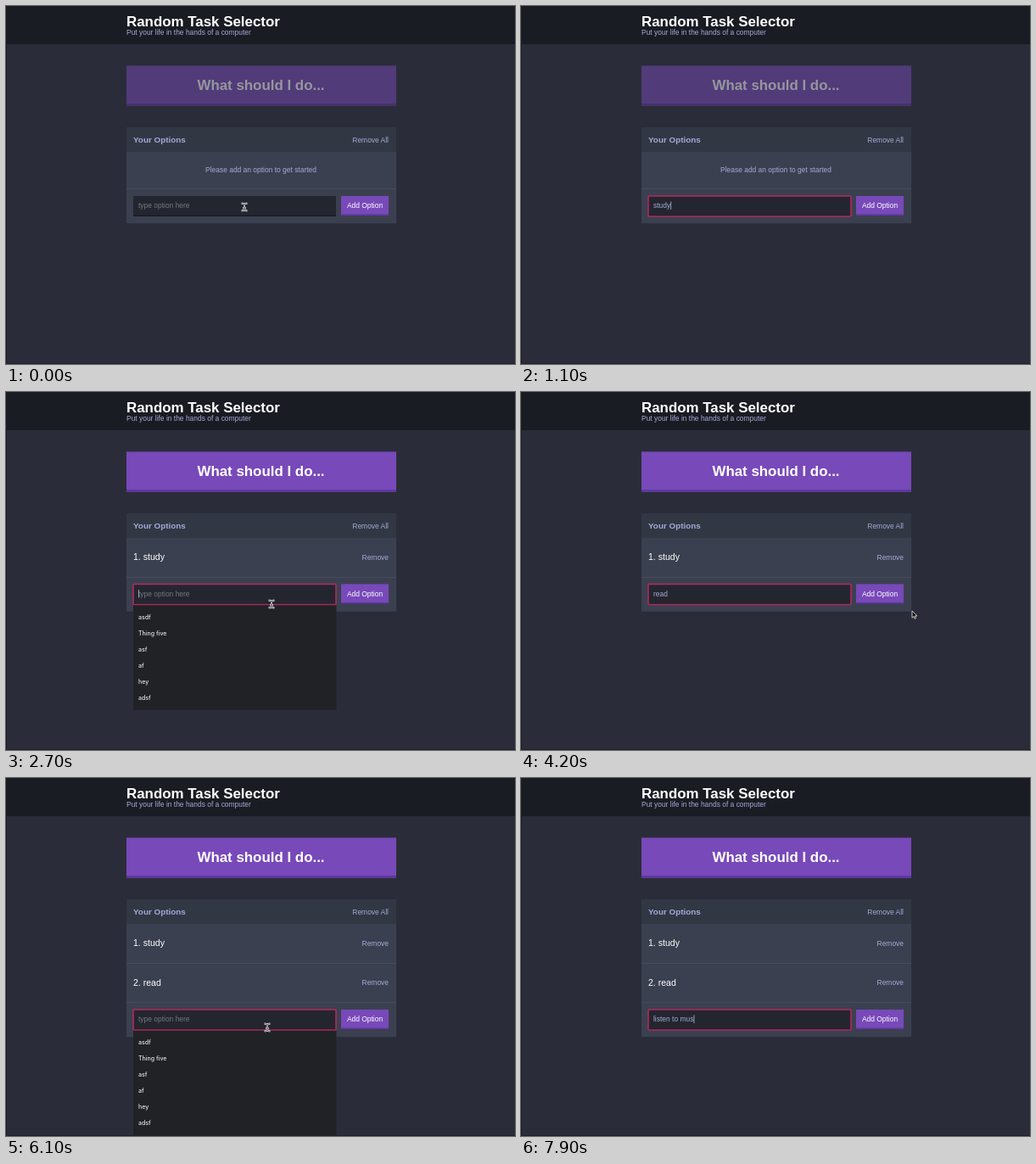
An HTML page that plays this animation: 600x422 px, repeating every 8 s.

```html
<!DOCTYPE html>
<html lang="en">
<head>
<meta charset="utf-8">
<title>Random Task Selector</title>
<style>
  html, body { margin: 0; width: 100%; height: 100%; overflow: hidden; background: #2a2d39; }
  svg { display: block; width: 600px; height: 422px; }
  text { font: 8.45px "Liberation Sans", Arial, sans-serif; fill: #a5a9d6; white-space: pre; }
  .title { font-size: 16.9px; font-weight: bold; fill: #fff; }
  .heading { font-size: 9.88px; font-weight: bold; }
  .task { font-size: 10.56px; fill: #fff; }
  .white { fill: #fff; }
  .hint { fill: #75777d; }
  .end { text-anchor: end; }
  .mid { text-anchor: middle; }
  .line { fill: #4a4f60; }
  #menu text { font: 500 7px Inter, "Open Sans", sans-serif; fill: #e6e6e8; }
</style>
</head>
<body>
<svg viewBox="0 0 600 422">
  <rect width="600" height="422" fill="#2a2d39"/>
  <rect width="600" height="45" fill="#1a1c23"/>
  <rect width="1" height="422" fill="#1a1c22"/>
  <rect y="421" width="600" height="1" fill="#1f2129"/>
  <text class="title" x="142" y="23.5">Random Task Selector</text>
  <text x="142" y="34.3">Put your life in the hands of a computer</text>

  <g id="pick">
    <rect x="142" y="70.5" width="318" height="47.5" fill="#5f379f"/>
    <rect x="142" y="70.5" width="318" height="44.5" fill="#7849b9"/>
    <text class="title mid" x="300.5" y="98.5">What should I do...</text>
  </g>

  <rect id="panel" x="142" y="143.5" width="318" fill="#3b4050"/>
  <rect x="142" y="143.5" width="318" height="28.5" fill="#323744"/>
  <text class="heading" x="150" y="161">Your Options</text>
  <text class="end" x="451" y="160.5">Remove All</text>
  <text id="empty" class="mid" x="300.5" y="196">Please add an option to get started</text>

  <g id="task1">
    <text class="task" x="150" y="198.3">1. study</text>
    <text class="end" x="451" y="197.5">Remove</text>
    <rect class="line" x="142" y="218" width="318" height=".8"/>
  </g>
  <g id="task2">
    <text class="task" x="150" y="244.8">2. read</text>
    <text class="end" x="451" y="244">Remove</text>
    <rect class="line" x="142" y="264.3" width="318" height=".8"/>
  </g>

  <g id="form">
    <rect id="formLine" class="line" x="142" y="215" width="318" height=".8"/>
    <rect x="150" y="224" width="239" height="24" fill="#24262f"/>
    <rect x="150" y="246.7" width="239" height="1.3" fill="#17191f"/>
    <rect id="ring" x="150" y="224" width="239" height="24" rx="1" fill="none" stroke="#b3295f" stroke-width="1.6"/>
    <text id="hint" class="hint" x="156" y="238">type option here</text>
    <text id="typed" x="156" y="238"></text>
    <rect id="caret" y="230.5" width=".8" height="9.5" fill="#b4b7d8"/>
    <rect x="395" y="224" width="56" height="23" fill="#5f379f"/>
    <rect x="395" y="224" width="56" height="21.5" fill="#7849b9"/>
    <text class="white mid" x="423" y="238">Add Option</text>
    <g id="menu"><rect id="menuBox" x="150" y="248.8" width="239.5" fill="#212226"/></g>
  </g>

  <g id="ibeam" fill="none" stroke-linecap="square">
    <path id="beam" d="M-2.3-4.3Q0-4.3 0-3Q0-4.3 2.3-4.3M0-3V3M-2.3 4.3Q0 4.3 0 3Q0 4.3 2.3 4.3M-1 1.3H1" stroke="#dcdce0" stroke-width="1.9"/>
    <use href="#beam"/>
    <path d="M-2.3-4.3Q0-4.3 0-3Q0-4.3 2.3-4.3M0-3V3M-2.3 4.3Q0 4.3 0 3Q0 4.3 2.3 4.3M-1 1.3H1" stroke="#30323a" stroke-width=".7"/>
  </g>
  <path id="arrow" d="M0 0V8.2L1.9 6.5L3.1 9.2L4.5 8.6L3.3 6H5.8Z" fill="#111" stroke="#eee" stroke-width=".8"/>
  <path id="hand" d="M-1 0Q-.2-1 .6 0V3.2L4.4 4Q5.2 4.4 5 5.5L4.3 9H-.5L-3.2 5.5Q-3.2 4.2-2 4.7L-1 5.5Z" fill="#fff" stroke="#222" stroke-width=".6"/>
</svg>
<script>
const $ = id => document.getElementById(id);
const LOOP = 8000, STEP = 100;
const FORM_Y = [0, 2.5, 49];
const ADDED = [1900, 4700];
const RECENT = ["asdf", "Thing five", "asf", "af", "hey", "adsf"];

// One entry per use of the input: focus, menu opening, key times, submit.
const SESSIONS = [
  { focus: 100, open: 200, end: 1900, text: "study", keys: [500, 600, 700, 800, 900] },
  { focus: 2600, open: 2700, end: 4700, text: "read ", keys: [2800, 3000, 3200, 3400, 3500] },
  { focus: 5400, open: 5500, end: LOOP, text: "listen to mus", match: "lunch",
    keys: [6300, 6500, 6700, 6800, 6900, 7000, 7100, 7200, 7300, 7500, 7700, 7800, 7900] }
];

// Pointer trips as [time, x, y]; it hides while keys are typed.
const TRIPS = [
  { until: 500, path: [[0, 281, 237]] },
  { until: 2800, path: [[1200, 281, 237], [1400, 350, 244], [1700, 425, 240], [2100, 425, 240], [2300, 370, 247], [2500, 313, 250]] },
  { until: 6300, path: [[3900, 313, 250], [4100, 488, 268], [4200, 461, 258], [4500, 425, 240], [4900, 425, 240], [5100, 370, 270], [5300, 308, 294]] }
];

const show = (id, on) => $(id).style.display = on ? "" : "none";
const move = (id, x, y) => $(id).setAttribute("transform", `translate(${x} ${y})`);

const rows = RECENT.map((word, i) => {
  const row = document.createElementNS("http://www.w3.org/2000/svg", "text");
  row.setAttribute("x", 156);
  row.setAttribute("y", 265 + i * 19);
  row.textContent = word;
  return $("menu").appendChild(row);
});

function pointAt(path, t) {
  const next = path.findIndex(p => p[0] > t);
  if (next < 0) return path[path.length - 1].slice(1);
  const [t0, x0, y0] = path[next - 1], [t1, x1, y1] = path[next];
  const k = (t - t0) / (t1 - t0);
  return [x0 + (x1 - x0) * k, y0 + (y1 - y0) * k];
}

function drawMenu(words) {
  show("menu", words.length);
  $("menuBox").setAttribute("height", words.length * 19 + 9.5);
  rows.forEach((row, i) => row.textContent = words[i] || "");
}

function drawInput(t) {
  const s = SESSIONS.find(s => t >= s.focus && t < s.end);
  const count = s ? s.keys.filter(k => k <= t).length : 0;
  $("typed").textContent = s ? s.text.slice(0, count) : "";
  show("hint", !count);
  show("ring", s);
  const last = s && (count ? s.keys[count - 1] : s.focus);
  show("caret", s && Math.floor((t - last) / 500) % 2 === 0);
  $("caret").setAttribute("x", 156.2 + (count ? $("typed").getComputedTextLength() : 0));
  let words = [];
  if (s && t >= s.open && !count) words = RECENT;
  if (s && s.match && count === 1) words = [s.match];
  drawMenu(words);
}

function drawPointer(t, dy) {
  const trip = TRIPS.find(r => t >= r.path[0][0] && t < r.until);
  let kind = "";
  if (trip) {
    const [x, y] = pointAt(trip.path, t);
    const inForm = y >= 224 + dy && y <= 248 + dy;
    const onRemove = dy > 40 && x > 419 && x < 451 && y > 235 && y < 247;
    if (inForm && x > 150 && x < 389) kind = "ibeam";
    else if (onRemove || inForm && x > 395 && x < 451) kind = "hand";
    else kind = "arrow";
    move(kind, x, y);
  }
  for (const id of ["ibeam", "arrow", "hand"]) show(id, id === kind);
}

function draw(now) {
  const t = Math.floor(now % LOOP / STEP) * STEP;
  const tasks = ADDED.filter(a => a <= t).length;
  const dy = FORM_Y[tasks];
  $("pick").setAttribute("opacity", tasks ? 1 : 0.5);
  $("panel").setAttribute("height", 112.7 + dy);
  show("empty", !tasks);
  show("formLine", !tasks);
  show("task1", tasks > 0);
  show("task2", tasks > 1);
  move("form", 0, dy);
  drawInput(t);
  drawPointer(t, dy);
}

const start = performance.now();
function tick() {
  draw(performance.now() - start);
  requestAnimationFrame(tick);
}
tick();
</script>
</body>
</html>
```
